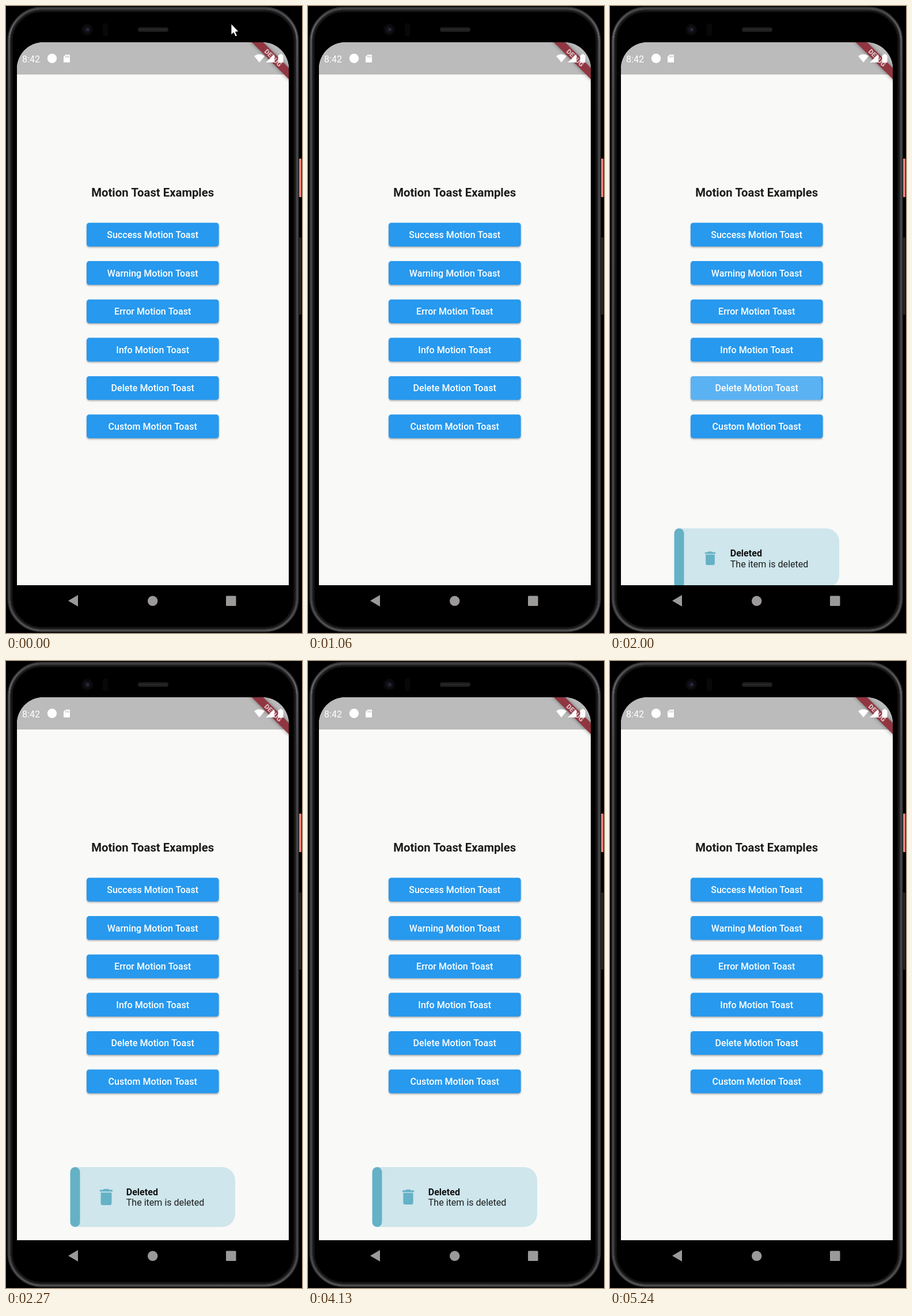
Recreate the animation shown at these times as an HTML page with a canvas. Size 514x1089 px, loop 5280 ms.

```html
<!DOCTYPE html>
<html lang="en">
<head>
<meta charset="utf-8">
<title>Motion Toast Examples</title>
<style>
  html, body { margin: 0; width: 100%; height: 100%; overflow: hidden; background: #000; }
  canvas { display: block; }
</style>
</head>
<body>
<canvas id="stage" width="514" height="1089"></canvas>
<script>
const ctx = document.getElementById('stage').getContext('2d');
const LOOP = 5280;
const SCREEN = { x: 19, y: 63, w: 472, h: 943 };
const BLUE = '#2799ee', TEAL = '#65b1c6', TEAL_LIGHT = '#cee6ec';
const LABELS = ['Success', 'Warning', 'Error', 'Info', 'Delete', 'Custom'];
const SHOW = 1635, SLIDE = 600, HIDE = SHOW + 3000, TRAVEL = 262;
const TAP = 1560, SPLASH_FULL = 2010, SPLASH_END = 2190;

const clamp = v => Math.max(0, Math.min(1, v));
const span = (t, a, b) => clamp((t - a) / (b - a));

// cubic-bezier(.25, .1, .25, 1)
function ease(x) {
  const bez = (a, b, s) => 3 * a * s * (1 - s) ** 2 + 3 * b * s * s * (1 - s) + s ** 3;
  let lo = 0, hi = 1;
  for (let i = 0; i < 20; i++) {
    const mid = (lo + hi) / 2;
    if (bez(0.25, 0.25, mid) < x) lo = mid; else hi = mid;
  }
  return bez(0.1, 1, (lo + hi) / 2);
}

function box(x, y, w, h, r, fill) {
  ctx.beginPath();
  ctx.roundRect(x, y, w, h, r);
  ctx.fillStyle = fill;
  ctx.fill();
}

// concentric outline of the phone body
function ring(inset, width, stroke) {
  ctx.beginPath();
  ctx.roundRect(2 + inset, 1 + inset, 507 - 2 * inset, 1087 - 2 * inset, 60 - inset);
  ctx.lineWidth = width;
  ctx.strokeStyle = stroke;
  ctx.stroke();
}

function disc(x, y, r, fill) {
  ctx.beginPath();
  ctx.arc(x, y, r, 0, 7);
  ctx.fillStyle = fill;
  ctx.fill();
}

function poly(points, fill) {
  ctx.beginPath();
  points.forEach(([x, y]) => ctx.lineTo(x, y));
  ctx.closePath();
  ctx.fillStyle = fill;
  ctx.fill();
}

function text(str, x, y, size, weight, fill, align = 'left') {
  ctx.font = `${weight} ${size}px Roboto, sans-serif`;
  ctx.textAlign = align;
  ctx.fillStyle = fill;
  ctx.fillText(str, x, y);
}

function phone() {
  ctx.fillStyle = '#000';
  ctx.fillRect(0, 0, 514, 1089);
  box(509, 265, 4, 67, 1, '#ee7f78');
  box(509, 402, 4, 134, 1, '#242426');
  const metal = ctx.createLinearGradient(0, 0, 0, 1089);
  metal.addColorStop(0, '#4a4a4d');
  metal.addColorStop(0.04, '#77777a');
  metal.addColorStop(0.14, '#59595c');
  metal.addColorStop(0.95, '#525255');
  metal.addColorStop(1, '#626265');
  ring(1.5, 2, '#353537');
  ring(3.5, 2, metal);
  ring(5.5, 2, '#38383a');
  ring(8, 3, '#161617');

  disc(141, 41, 10, '#0a0a0c');
  disc(141, 41, 5.5, '#14151d');
  disc(142, 41, 2, '#30354c');
  box(168, 30, 9, 22, 4, '#08080a');
  box(229, 37, 53, 8, 4, '#1d1d1d');
  box(231, 40, 49, 2, 1, '#2b2927');

  const grey = '#9c9a99';
  poly([[108, 1033], [125, 1023], [125, 1043]], grey);
  disc(254.7, 1033.3, 8.7, grey);
  box(382, 1024.5, 17.5, 17.5, 1.5, grey);
}

function banner() {
  ctx.save();
  ctx.translate(491, 63);
  ctx.rotate(Math.PI / 4);
  ctx.shadowColor = 'rgba(0,0,0,.45)';
  ctx.shadowBlur = 6;
  ctx.fillStyle = '#913641';
  ctx.fillRect(-50, 31.5, 100, 13.8);
  ctx.shadowColor = 'transparent';
  text('DEBUG', 0, 42.4, 11.7, 900, '#dcc0c4', 'center');
  ctx.restore();
}

function statusBar() {
  ctx.fillStyle = '#bbbbbb';
  ctx.fillRect(SCREEN.x, SCREEN.y, SCREEN.w, 56);
  banner();
  text('8:42', 28, 97.5, 16.1, 400, '#fff');
  disc(80, 91, 8.2, '#fff');

  poly([[103.5, 84.5], [111, 84.5], [111, 98], [100, 98], [100, 88]], '#fff');
  ctx.fillStyle = '#bbbbbb';
  for (let i = 0; i < 3; i++) ctx.fillRect(103.2 + i * 2.5, 86.5, 1.2, 3);

  ctx.beginPath();
  ctx.moveTo(440, 98);
  ctx.lineTo(431, 87);
  ctx.quadraticCurveTo(440, 80.5, 449, 87);
  ctx.closePath();
  ctx.fillStyle = '#fff';
  ctx.fill();
  poly([[451, 98], [466, 84], [466, 98]], '#fff');
  box(472.5, 85, 9, 13.5, 1.5, '#fff');
  ctx.fillRect(475, 83.5, 4, 2);
}

function splash(x, y, w, h, t) {
  if (t < TAP || t > SPLASH_END) return;
  ctx.save();
  ctx.beginPath();
  ctx.roundRect(x, y, w, h, 4.6);
  ctx.clip();
  const alpha = 0.24 * span(t, TAP, TAP + 80) * (1 - span(t, SPLASH_FULL, SPLASH_END));
  disc(240, y + h / 2, 20 + 110 * span(t, TAP, SPLASH_FULL), `rgba(255,255,255,${alpha})`);
  ctx.restore();
}

function buttons(t) {
  LABELS.forEach((label, i) => {
    const x = 140, y = 376.5 + i * 66.6, w = 229.6, h = 41.2;
    ctx.save();
    ctx.shadowColor = 'rgba(0,0,0,.3)';
    ctx.shadowBlur = 3;
    ctx.shadowOffsetY = 1.8;
    box(x, y, w, h, 4.6, BLUE);
    ctx.restore();
    if (label === 'Delete') splash(x, y, w, h, t);
    text(label + ' Motion Toast', 254.7, y + 26.4, 16.07, 500, '#fff', 'center');
  });
}

const bin = new Path2D('M6 19c0 1.1.9 2 2 2h8c1.1 0 2-.9 2-2V7H6v12z' +
  'M19 4h-3.5l-1-1h-5l-1 1H5v2h14V4z');

function toast(t) {
  if (t < SHOW || t > HIDE + SLIDE) return;
  const p = t < HIDE ? span(t, SHOW, SHOW + SLIDE) : 1 - span(t, HIDE, HIDE + SLIDE);
  const y = 879 + TRAVEL * (1 - ease(p));
  box(119, y, 279, 104, [0, 23, 23, 0], TEAL_LIGHT);
  box(111.5, y, 17, 104, 8.5, TEAL);

  // icon beats linearly between half and full size, one second each way
  const beat = 1 - Math.abs(1 - ((t - SHOW) / 1000) % 2);
  const scale = 46 / 24 * (0.5 + beat / 2);
  ctx.save();
  ctx.translate(174, y + 52);
  ctx.scale(scale, scale);
  ctx.translate(-12, -12);
  ctx.fillStyle = TEAL;
  ctx.fill(bin);
  ctx.restore();

  text('Deleted', 208.7, y + 48.7, 16.07, 700, '#111');
  text('The item is deleted', 208.7, y + 67.2, 16.07, 400, '#1b1b1b');
}

function cursor(t) {
  if (t > 250) return;
  const shape = [[0, 0], [0, 19], [4.3, 15.2], [7.4, 22], [10.4, 20.6], [7.4, 14], [13, 13.5]];
  ctx.save();
  ctx.translate(391, 31 + 32 * (t / 250) ** 2);
  poly(shape, '#fff');
  ctx.lineWidth = 0.8;
  ctx.strokeStyle = '#000';
  ctx.stroke();
  ctx.restore();
}

function draw(t) {
  phone();
  ctx.save();
  ctx.beginPath();
  ctx.roundRect(SCREEN.x, SCREEN.y, SCREEN.w, SCREEN.h, [46, 46, 0, 0]);
  ctx.clip();
  ctx.fillStyle = '#f9f9f8';
  ctx.fillRect(SCREEN.x, SCREEN.y, SCREEN.w, SCREEN.h);
  text('Motion Toast Examples', 254.7, 330.5, 20.3, 700, '#1b1b1b', 'center');
  buttons(t);
  toast(t);
  statusBar();
  ctx.restore();
  cursor(t);
}

const start = performance.now();
function tick() {
  draw((performance.now() - start) % LOOP);
  requestAnimationFrame(tick);
}
tick();
</script>
</body>
</html>
```
